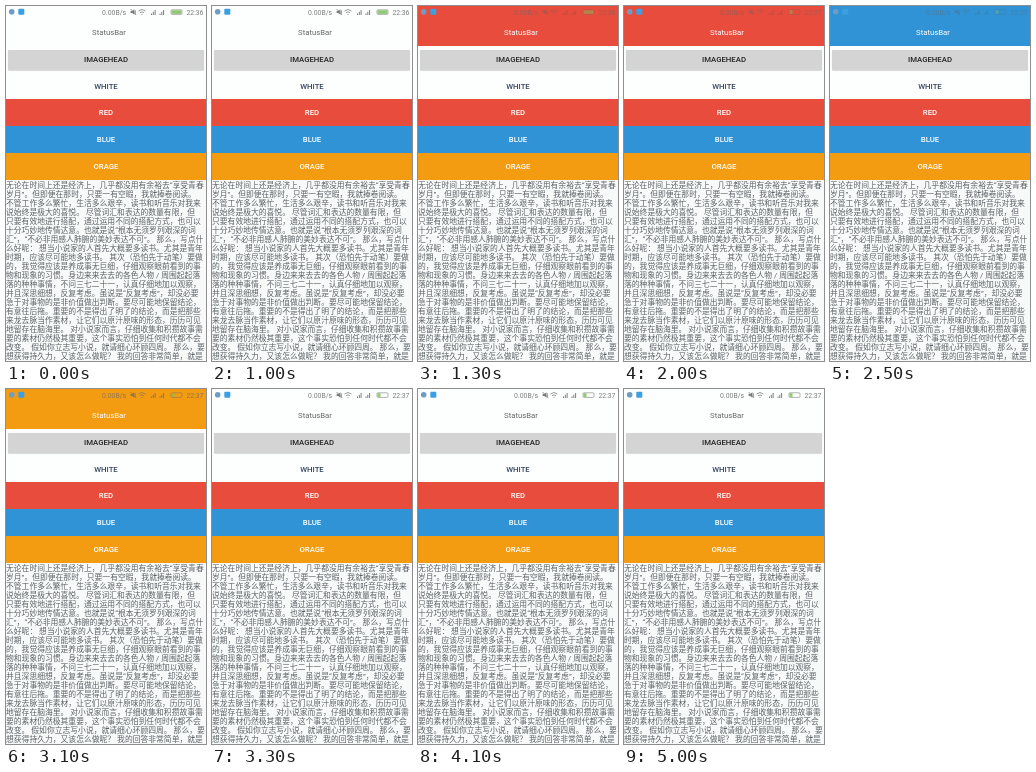
Recreate the animation shown at these times as an HTML page. Size 200x355 px, loop 5100 ms.

```html
<!DOCTYPE html>
<html>
<head>
<meta charset="utf-8">
<style>
  html, body { margin: 0; width: 100%; height: 100%; overflow: hidden; }
  body { background: #f7faf9; font: 7.78px Roboto, "Noto Sans CJK SC", "Noto Sans CJK", sans-serif; }
  #stage { position: relative; width: 200px; height: 355px; overflow: hidden; }
  #top { position: absolute; width: 200px; height: 174px; background: #fdfefe; }
  #head { position: absolute; width: 200px; height: 40px; color: #666; }
  #title { position: absolute; top: 22px; left: 3px; width: 200px; text-align: center; line-height: 10px; }
  #head svg { position: absolute; left: 0; top: 0; }
  .btn { position: absolute; left: 0; width: 200px; height: 27px; line-height: 27px;
    text-align: center; font-weight: 500; color: #fff; }
  #image { left: 2px; top: 43.5px; width: 196px; height: 20.5px; line-height: 20px;
    background: #d5d4d5; color: #222; border-radius: 1px; box-shadow: 0 .4px .8px #0004; }
  #text { position: absolute; left: 0; top: 175px; margin: 0; font: inherit; font-size: 7.8px;
    line-height: 9px; white-space: pre; color: #5c6166; }
</style>
</head>
<body>
<div id="stage">
  <div id="top"></div>
  <div id="head">
    <svg width="200" height="14" fill="currentColor">
      <circle cx="5.7" cy="5.8" r="2.8" fill="#6f9cc4"/>
      <rect x="12.3" y="2.8" width="6" height="6" rx="1" fill="#3b9fe3"/>
      <g id="status">
        <text x="96" y="8.6" font-size="6.9">0.00B/s</text>
        <text id="clock" x="180.5" y="8.6" font-size="6.8"></text>
        <g fill="none" stroke="currentColor" stroke-width=".8">
          <path d="M129.3 4.2v3.8M124.6 3l5.6 6"/>
          <path d="M132.5 5q3.5-3 7 0M134 6.8q2-1.8 4 0"/>
          <rect x="165" y="3.8" width="11" height="4.6" rx="1" stroke-width=".6"/>
        </g>
        <path d="M124.6 5h1.6l2.2-1.8v5.6L126.200 7h-1.600zM135.200 8l.8.9.8-.9z"/>
        <path id="bars" d="M145 9h1V7.400h-1zM146.800 9h1V5.800h-1zM148.600 9h1V4h-1z"/>
        <use href="#bars" x="8.500"/>
        <rect id="charge" x="165.500" y="4.300" height="3.600" fill="#7fbf5a"/>
      </g>
    </svg>
    <div id="title">StatusBar</div>
  </div>
  <div class="btn" id="image">IMAGEHEAD</div>
  <pre id="text">无论在时间上还是经济上，几乎都没用有余裕去“享受青春
岁月”。但即便在那时，只要一有空暇，我就捧卷阅读。
不管工作多么繁忙，生活多么艰辛，读书和听音乐对我来
说始终是极大的喜悦。 尽管词汇和表达的数量有限，但
只要有效地进行搭配，通过运用不同的搭配方式，也可以
十分巧妙地传情达意。也就是说“根本无须罗列艰深的词
汇”，“不必非用感人肺腑的美妙表达不可”。 那么，写点什
么好呢： 想当小说家的人首先大概要多读书。尤其是青年
时期，应该尽可能地多读书。 其次（恐怕先于动笔）要做
的，我觉得应该是养成事无巨细，仔细观察眼前看到的事
物和现象的习惯。身边来来去去的各色人物 / 周围起起落
落的种种事情，不问三七二十一，认真仔细地加以观察，
并且深思细想，反复考虑。虽说是“反复考虑”，却没必要
急于对事物的是非价值做出判断。要尽可能地保留结论，
有意往后拖。重要的不是得出了明了的结论，而是把那些
来龙去脉当作素材，让它们以原汁原味的形态，历历可见
地留存在脑海里。 对小说家而言，仔细收集和积攒故事需
要的素材仍然极其重要，这个事实恐怕到任何时代都不会
改变。 假如你立志写小说，就请细心环顾四周。 那么，要
想获得持久力，又该怎么做呢？ 我的回答非常简单，就是</pre>
</div>
<script>
  const LOOP = 5100;
  const WHITE = '#fdfefe', RED = '#e74c3c', BLUE = '#2f93d6', ORANGE = '#f39c12';
  // Start time, header colour, status opacity
  const themes = [[0, WHITE, .85], [1300, RED, .5], [2100, BLUE, .45], [2700, ORANGE, .7], [3300, WHITE, .85]];
  const $ = id => document.getElementById(id);

  [['WHITE', WHITE], ['RED', RED], ['BLUE', BLUE], ['ORAGE', ORANGE]].forEach(([label, color], i) => {
    const b = document.createElement('div');
    b.className = 'btn';
    b.textContent = label;
    b.style.background = color;
    b.style.top = Math.round(66.7 + i * 26.7) + 'px';
    if (color === WHITE) b.style.color = '#34435e';
    $('stage').append(b);
  });

  function draw() {
    const t = performance.now() % LOOP;
    const [, color, alpha] = themes.findLast(([start]) => t >= start);
    const early = t < 1800;
    $('head').style.background = color;
    $('title').style.color = color === WHITE ? '#666' : '#fff';
    $('status').style.opacity = alpha;
    $('clock').textContent = early ? '22:36' : '22:37';
    $('charge').setAttribute('width', early ? 10 : 3);
    requestAnimationFrame(draw);
  }
  draw();
</script>
</body>
</html>
```
